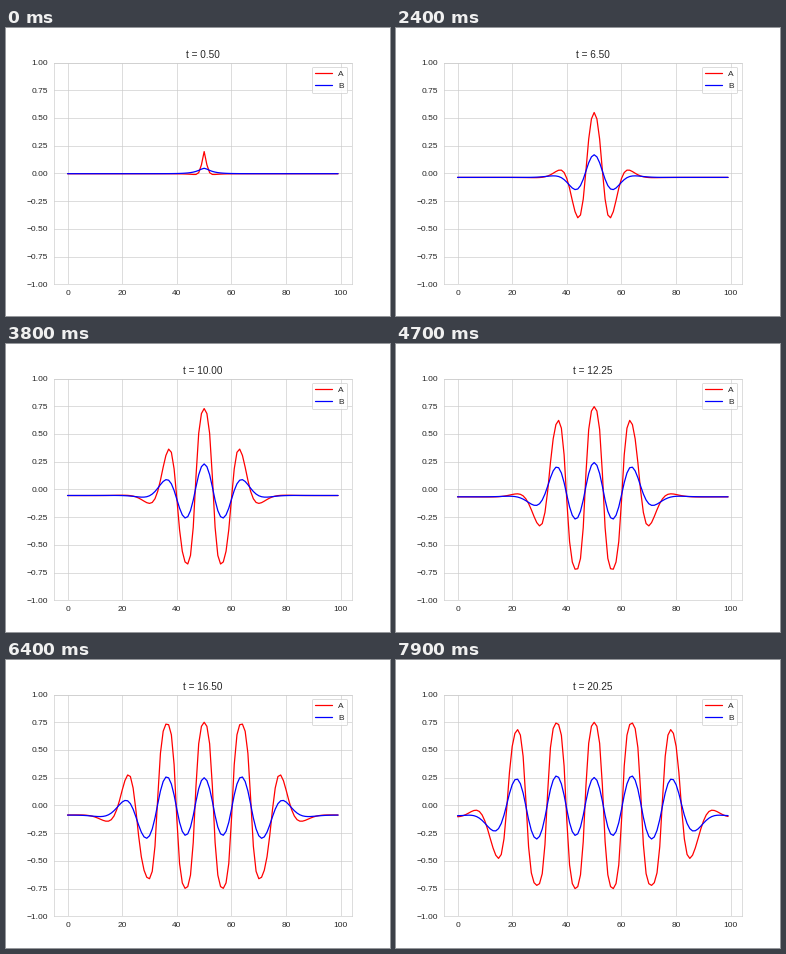
A matplotlib script for the animation above (8000 ms loop, 384x288 px).

```python
import numpy as np
import matplotlib.pyplot as plt
from matplotlib.animation import FuncAnimation

FRAMES, INTERVAL = 80, 100
WIDTH, DT, STEPS = 100, 0.001, 250
DA, DB, ALPHA, BETA = 1, 100, -0.005, 10

GREY, INK = "0.8", "0.15"
plt.rcParams.update({
    "font.family": "Liberation Sans",
    "text.color": INK,
    "axes.edgecolor": GREY,
    "axes.axisbelow": True,
    "axes.grid": True,
    "grid.color": GREY,
    "xtick.color": INK,
    "ytick.color": INK,
    "xtick.bottom": False,
    "ytick.left": False,
    "lines.solid_capstyle": "round",
})


def laplacian(u):
    return np.roll(u, 1) + np.roll(u, -1) - 2 * u


def simulate():
    """Reaction-diffusion on a ring, seeded by a single spike in A."""
    a, b = np.zeros(WIDTH), np.zeros(WIDTH)
    a[WIDTH // 2] = 0.3
    states = []
    for _ in range(FRAMES + 1):
        for _ in range(STEPS):
            da = DA * laplacian(a) + a - a * a * a - b + ALPHA
            db = DB * laplacian(b) + BETA * (a - b)
            a, b = a + DT * da, b + DT * db
        states.append((a, b))
    return states[1:]


states = simulate()

fig, ax = plt.subplots(figsize=(6.4, 4.8), dpi=60)
line_a, = ax.plot(states[0][0], color="r", label="A")
line_b, = ax.plot(states[0][1], color="b", label="B")
ax.set_ylim(-1, 1)
ax.legend(loc="upper right")
title = ax.set_title("")


def update(i):
    a, b = states[i]
    line_a.set_ydata(a)
    line_b.set_ydata(b)
    title.set_text(f"t = {(i + 2) * STEPS * DT:.2f}")
    return line_a, line_b, title


anim = FuncAnimation(fig, update, frames=FRAMES, interval=INTERVAL,
                     repeat=True, repeat_delay=0)
plt.show()
```
